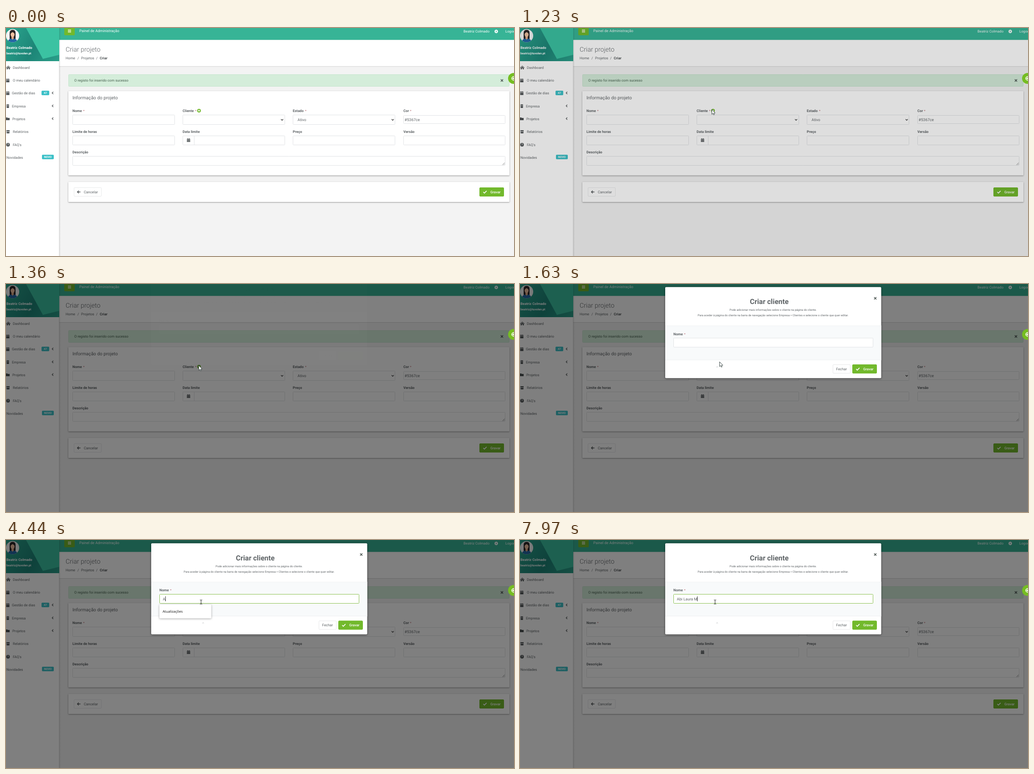
An HTML page with a canvas that plays this animation: 1116x502 px, repeating every 8000 ms.

```html
<!DOCTYPE html>
<html lang="pt">
<head>
<meta charset="utf-8">
<title>Criar projeto</title>
<style>
html, body { margin: 0; width: 100%; height: 100%; overflow: hidden; background: #f3f3f3; }
canvas { display: block; }
</style>
</head>
<body>
<canvas id="stage" width="1116" height="502"></canvas>
<script>
const W = 1116, H = 502, LOOP = 8000;
const ctx = document.getElementById('stage').getContext('2d');
const INK = '#5f6467', GREEN = '#72b92c', TEAL = '#37b496', LINE = '#e1e3e6', CYAN = '#3ec1c8';
const USER = 'Beatriz Colmado', TYPED = 'Abi Laura M';

// [time, letters typed]
const KEYS = [[1960, 0], [3360, 1], [4700, 2], [4910, 3], [5180, 4], [5920, 5],
  [6370, 6], [6630, 7], [6770, 8], [6970, 9], [7700, 10], [7970, 11]];
// [time, x, y] of the pointer tip
const MOVES = [[70, 950, 491], [260, 760, 360], [450, 560, 238], [620, 446, 186], [740, 414, 176],
  [820, 419, 179], [950, 421, 179], [1230, 421, 179], [1360, 423, 179], [1500, 432, 177],
  [1630, 438, 171], [1830, 428, 136]];

const clamp = v => Math.min(1, Math.max(0, v));

function rect(x, y, w, h, fill) {
  ctx.fillStyle = fill;
  ctx.fillRect(x, y, w, h);
}

function box(x, y, w, h, fill, stroke, r = 1) {
  ctx.beginPath();
  ctx.roundRect(x + .5, y + .5, w - 1, h - 1, r);
  ctx.fillStyle = fill;
  ctx.fill();
  ctx.strokeStyle = stroke || fill;
  ctx.lineWidth = 1;
  ctx.stroke();
}

function card(x, y, w, h, blur, alpha, r = 1) {
  ctx.save();
  ctx.shadowColor = `rgba(0,0,0,${alpha})`;
  ctx.shadowBlur = blur;
  ctx.shadowOffsetY = 1;
  ctx.beginPath();
  ctx.roundRect(x, y, w, h, r);
  ctx.fillStyle = '#fff';
  ctx.fill();
  ctx.restore();
}

function disc(x, y, r, fill) {
  ctx.beginPath();
  ctx.arc(x, y, r, 0, 7);
  ctx.fillStyle = fill;
  ctx.fill();
}

function shape(d, x, y, fill, stroke, width = 1) {
  const path = new Path2D(d);
  ctx.save();
  ctx.translate(x, y);
  if (fill) { ctx.fillStyle = fill; ctx.fill(path); }
  if (stroke) { ctx.strokeStyle = stroke; ctx.lineWidth = width; ctx.stroke(path); }
  ctx.restore();
}

// cy is the middle of the capitals
function text(s, x, cy, size = 7.7, color = INK, weight = 400, align = 'left', family = 'Roboto') {
  ctx.font = `${weight} ${size}px "${family}", sans-serif`;
  ctx.textAlign = align;
  ctx.fillStyle = color;
  ctx.fillText(s, x, cy + size * .36);
}

function label(s, x, cy, starX) {
  text(s, x, cy, 7.75, INK, 700);
  if (starX) text('*', starX, cy, 7, '#b8666c');
}

function cross(x, y) {
  shape('M-2.5-2.5L2.5 2.5M2.5-2.5L-2.5 2.5', x, y, null, '#4b5552', 1.6);
}

function saveButton(x, y) {
  box(x, y, 54, 20, GREEN, GREEN, 1.5);
  shape('M-3.5 0L-1 2.6L3.8-2.4', x + 12, y + 10, null, '#fff', 1.7);
  text('Gravar', x + 24, y + 10, 7.7, '#fff', 500);
}

function gear(x, y) {
  for (let i = 0; i < 8; i++) {
    ctx.save();
    ctx.translate(x, y);
    ctx.rotate(i * Math.PI / 4);
    rect(-.9, -4, 1.8, 3, '#fff');
    ctx.restore();
  }
  disc(x, y, 3, '#fff');
  disc(x, y, 1.2, TEAL);
}

function calendar(x, y) {
  rect(x - 3.5, y - 3, 7, 7, '#4d5254');
  rect(x - 2.3, y - 4.2, 1.2, 2, '#4d5254');
  rect(x + 1.1, y - 4.2, 1.2, 2, '#4d5254');
  rect(x - 3.5, y - 1.4, 7, .8, '#fff');
}

function profile() {
  const g = ctx.createLinearGradient(0, 0, 117, 73);
  g.addColorStop(0, '#2ba58e');
  g.addColorStop(.55, '#1d8577');
  g.addColorStop(1, '#2a9f89');
  rect(0, 0, 117, 73, g);
  shape('M44 0H117V59L81 68Z', 0, 0, '#3bc2a2');
  ctx.save();
  ctx.beginPath();
  ctx.arc(14.5, 17, 14.5, 0, 7);
  ctx.clip();
  rect(0, 0, 30, 32, '#f4f6f6');
  shape('M8 24V11Q8 4 14.5 4Q21 4 21 11V24Z', 0, 0, '#2b2526');
  shape('M3 33Q4 23 14.5 23Q25 23 26 33Z', 0, 0, '#2467a5');
  shape('M12 18H17V23L14.5 26L12 23Z', 0, 0, '#dda583');
  ctx.beginPath();
  ctx.ellipse(14.5, 14, 4.4, 6, 0, 0, 7);
  ctx.fillStyle = '#efc0a0';
  ctx.fill();
  shape('M10 13Q10 7 14.5 7Q19 7 19 13Q17 10 14.5 9Q12 10 10 13Z', 0, 0, '#2b2526');
  ctx.restore();
  text(USER, 1, 43, 7.6, '#fff', 700);
  text('beatriz@tuvolen.pt', 1, 56, 6.4, '#fff', 700);
}

function sidebar() {
  const g = ctx.createLinearGradient(115, 0, 120, 0);
  g.addColorStop(0, 'rgba(0,0,0,.2)');
  g.addColorStop(1, 'rgba(0,0,0,0)');
  rect(116, 0, 4, H, g);
  rect(0, 0, 116.5, H, '#fff');
  profile();
  const items = [['Dashboard', 15, 87], ['O meu calendário', 15, 115.5], ['Gestão de dias', 13, 143.5],
    ['Empresa', 13, 172], ['Projetos', 14, 200], ['Relatórios', 15, 228.5], ["FAQ's", 15, 257], ['Novidades', 1, 285]];
  for (const [s, x, y] of items) text(s, x, y);

  const dark = '#4d5254';
  shape('M0-4L5 .2L4.3 1L0-2.7L-4.3 1L-5 .2ZM0-1.8L3.3 1V4H1V1.5H-1V4H-3.3V1Z', 5, 87, dark);
  calendar(4, 115.5);
  calendar(4, 143.5);
  rect(1.5, 168, 5, 8, dark);
  for (let i = 0; i < 4; i++) rect(2.7 + i % 2 * 1.7, 169.4 + (i >> 1) * 2, 1, 1, '#fff');
  shape('M0-3H3L4-2H8V3H0Z', 0, 200, dark);
  rect(1, 225, 7, 2, dark);
  rect(1.5, 227.6, 6, 4.4, dark);
  rect(3.3, 228.4, 2.4, .8, '#fff');
  disc(4.5, 257, 3.9, dark);
  text('?', 4.5, 257, 6.3, '#fff', 700, 'center');

  box(78, 138, 17, 10, CYAN);
  text('47', 86.5, 143, 6, '#fff', 700, 'center');
  box(79, 279, 26, 10, CYAN);
  text('NOVO', 92, 284, 6, '#fff', 700, 'center');
  for (const y of [143, 171.5, 199.5]) shape('M1.4-2.5L-1.2 0L1.4 2.5', 102.5, y, null, dark, 1.2);
}

function header() {
  rect(117, 26, 999, 58, '#fff');
  rect(117, 84, 999, 1, '#dcdcdc');
  rect(117, 85, 999, 1, '#ececec');
  rect(117, 0, 999, 26, TEAL);
  rect(117, 26, 999, 1, '#d5ebe5');
  box(128, -3, 23, 19, GREEN);
  for (const y of [3.5, 6, 8.5]) rect(136, y, 7, 1.2, '#fff');
  text('Painel de Administração', 161, 6, 8.15, '#fff');
  text(USER, 1005, 7, 7.75, '#fff');
  gear(1077, 7.5);
  text('Logout', 1097, 7, 7.75, '#fff');
  text('Criar projeto', 131, 46.5, 14.2, INK, 300);
  text('Home', 131, 66.5, 7.8);
  text('/', 157, 66.5, 7.8);
  text('Projetos', 165, 66.5, 7.8);
  text('/', 198, 66.5, 7.8);
  text('Criar', 206, 66.5, 7.7, '#4d5254', 700);
}

function projectForm() {
  box(137, 102, 969, 27, '#d4edda', '#c6e6ce');
  text('O registo foi inserido com sucesso', 150, 115.5, 7.72, '#46604e');
  cross(1089.5, 115.5);

  card(137, 139, 969, 185.5, 3, .4);
  text('Informação do projeto', 146, 153, 10.1);
  label('Nome', 146, 182.5, 169.5);
  label('Cliente', 388, 182.5, 415.5);
  label('Estado', 630, 182.5, 657);
  label('Cor', 873, 182.5, 887.5);
  label('Limite de horas', 146, 228);
  label('Data limite', 388, 228);
  label('Preço', 630, 228);
  label('Versão', 873, 228);
  label('Descrição', 146, 273.5);
  disc(424, 182, 4, GREEN);
  shape('M-2.2 0H2.2M0-2.2V2.2', 424, 182, null, '#fff', 1.3);

  [146, 388, 630, 873].forEach((x, i) => {
    if (i < 3) box(x, 191, 225, 22, '#fff', LINE);
    else box(x, 192, 224, 19, '#fff', LINE);
    box(x, 237, i < 3 ? 225 : 224, 21, '#fff', LINE);
  });
  box(146, 282, 951, 21, '#fff', LINE);
  shape('M0 5L5 0M2.7 5L5 2.7', 1090.5, 296.5, null, '#777', .8);
  for (const x of [606.5, 849.5]) shape('M-2.4-1.2L0 1.3L2.4-1.2', x, 202, null, '#444', 1.3);
  text('Ativo', 640.5, 202, 8.4);
  text('#5367ce', 875.5, 201.5, 8.6);
  rect(413, 238, 1, 19, LINE);
  calendar(401, 247);
  for (const y of [248.2, 249.7]) for (const x of [398.6, 400.5, 402.4]) rect(x, y, 1, .7, '#fff');

  card(137, 339, 969, 44, 3, .4);
  box(149, 351, 61, 20, '#fff', '#e9eaeb', 1.5);
  shape('M3.5 0H-3M-.2-3L-3.2 0L-.2 3', 160, 361, null, '#4d5254', 1.3);
  text('Cancelar', 171, 361.5, 7.85);
  saveButton(1040, 351);
}

function floatButton() {
  disc(1115, 111, 12, '#76bd22');
  ctx.beginPath();
  ctx.arc(1115, 111, 4, 0, 7);
  ctx.strokeStyle = '#fff';
  ctx.lineWidth = 1.5;
  ctx.stroke();
  shape('M3 0H-2M0-2L-2 0L0 2', 1115, 111, null, '#fff', 1.4);
}

function nameField(t) {
  const focused = t >= 1960;
  const border = t >= 2030 ? '#8cc152' : focused ? '#b9d79a' : LINE;
  box(337, 119, 439, 21, '#fff', border);
  if (!focused) return;
  const [since, count] = KEYS.filter(k => k[0] <= t).pop();
  const value = TYPED.slice(0, count);
  text(value, 344.5, 129.5, 8.5);
  const caretOn = Math.floor((t - since) / 530) % 2 === 0;
  if (caretOn) rect(Math.floor(344.5 + ctx.measureText(value).width), 124, 1, 11, '#333');
}

function modal(t) {
  const p = clamp((t - 1360) / 300);
  if (!p) return;
  ctx.save();
  ctx.globalAlpha = clamp((t - 1360) / 150);
  ctx.translate(0, -30 * Math.pow(1 - p, 1.8));
  card(319, 7.3, 474.5, 200.5, 5, .5, 2);
  text('Criar cliente', 505, 39, 15.6, INK, 700);
  text('Pode adicionar mais informações sobre o cliente na página do cliente.', 556, 57.5, 6.15, INK, 400, 'center');
  text('Para aceder à página do cliente na barra de navegação selecione Empresa > Clientes e selecione o cliente que quer editar.',
    556, 69.5, 6.15, INK, 400, 'center');
  cross(780.5, 32);
  rect(319, 92, 474.5, 76, '#f8fafb');
  rect(319, 92, 474.5, 1, '#f1f3f4');
  rect(319, 167, 474.5, 1, '#eef0f1');
  label('Nome', 337, 110.5, 360.5);
  nameField(t);
  box(687, 177.5, 39, 20, '#fff', '#e7e8e9', 1.5);
  text('Fechar', 694.5, 187.5, 7.8);
  saveButton(730, 177.5);
  ctx.restore();
  if (t >= 1600) shape('M0 4L2.2 0L4.5 4L2.3 2.6Z', 430.8, 180.5, '#d3d5d6');
}

function suggestions(t) {
  if (t < 3360 || t >= 4840) return;
  ctx.save();
  ctx.globalAlpha = 1 - clamp((t - 4700) / 140);
  card(337, 142, 114, 30.5, 4, .35, 2);
  text('Atualizações', 344, 157.5, 7.6, '#111', 400, 'left', 'Open Sans');
  ctx.restore();
}

function pointer(t) {
  if (t < 70) return;
  let [, x, y] = MOVES[MOVES.length - 1];
  const i = MOVES.findIndex(m => m[0] > t);
  if (i > 0) {
    const [a, b] = [MOVES[i - 1], MOVES[i]];
    const k = (t - a[0]) / (b[0] - a[0]);
    x = a[1] + (b[1] - a[1]) * k;
    y = a[2] + (b[2] - a[2]) * k;
  }
  if (t > 1400 && y < 140) {
    shape('M-2.5-4.5H-.7L0-4L.7-4.5H2.5M0-4V4M-2.5 4.5H-.7L0 4L.7 4.5H2.5', x + .5, y + .5, null, '#222', 1);
  } else {
    shape('M0 0V10.5L2.4 8.3L4 11.8L5.6 11L4.1 7.7H7.3Z', x + .5, y + .5, '#fff', '#2c3a38', .9);
  }
}

function draw(t) {
  ctx.textRendering = 'geometricPrecision';
  rect(0, 0, W, H, '#f3f3f3');
  header();
  projectForm();
  sidebar();
  const fade = clamp((t - 1207) / 150);
  rect(0, 0, W, H, `rgba(0,0,0,${.5 * (1 - Math.pow(1 - fade, 1.7))})`);
  floatButton();
  modal(t);
  suggestions(t);
  pointer(t);
}

const start = performance.now();
function tick() {
  draw((performance.now() - start) % LOOP);
  requestAnimationFrame(tick);
}
tick();
</script>
</body>
</html>
```
